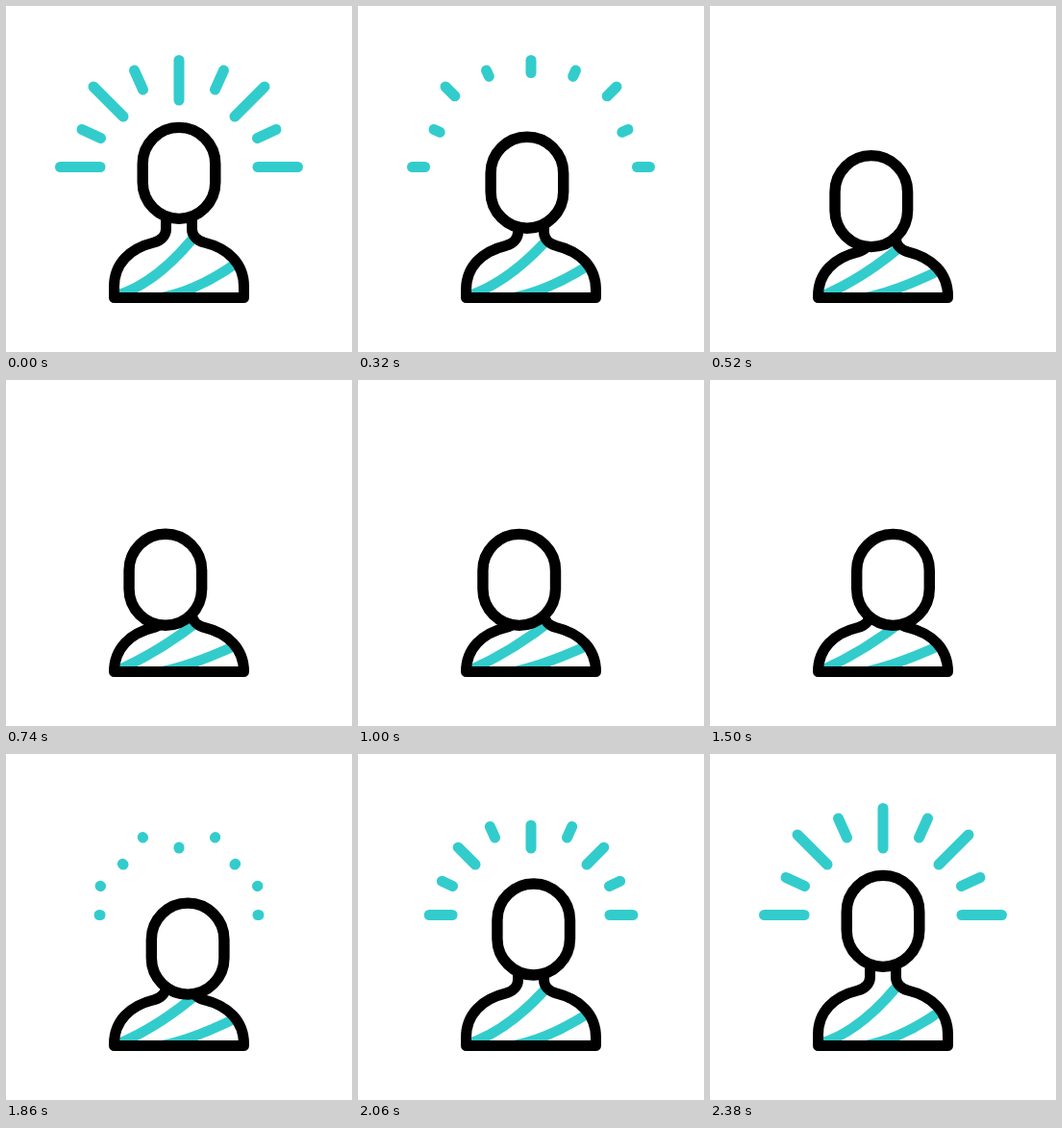
An HTML page for the animation above (2400 ms loop, 360 by 360 pixels).

```html
<!DOCTYPE html>
<html lang="en">
<head>
<meta charset="utf-8">
<title>Neck stretch</title>
<style>
  html, body { margin: 0; width: 100%; height: 100%; overflow: hidden; background: #fff; }
  svg { display: block; width: 100vw; height: 100vh; }
</style>
</head>
<body>
<svg viewBox="0 0 360 360" fill="none" stroke-linecap="round" stroke-linejoin="round">
  <clipPath id="torso"><path id="clip"/></clipPath>
  <g id="rays" stroke="#33cccc" stroke-width="11"></g>
  <g clip-path="url(#torso)" stroke="#33cccc" stroke-width="10.5">
    <path id="upper"/>
    <path id="lower"/>
  </g>
  <path id="body" stroke="#000" stroke-width="11"/>
  <rect id="head" x="142.2" y="126.4" width="75.6" height="95" rx="37.8" fill="#fff" stroke="#000" stroke-width="11.4"/>
</svg>
<script>
const LOOP = 2400, BASE = 303.5;
const DROP = 34, LEFT = -14.2, RIGHT = 10.8, SINK = 11.5;
const $ = id => document.getElementById(id);
const mix = (a, b, p) => a + (b - a) * p;

// Ease in and out along a cubic Bezier with handles at .64 and .3
function ease(x) {
  if (x <= 0) return 0;
  if (x >= 1) return 1;
  let lo = 0, hi = 1;
  for (let i = 0; i < 24; i++) {
    const s = (lo + hi) / 2, r = 1 - s;
    if (1.92 * s * r * r + 0.9 * s * s * r + s * s * s < x) lo = s; else hi = s;
  }
  return lo * lo * (3 - 2 * lo);
}
const phase = (t, from, to) => ease((t - from) / (to - from));

// Rays on the left half, outer end first; the right half mirrors them
const half = [
  [56.5, 167.5, 98, 167.5],
  [79, 128.5, 98.5, 137.5],
  [91, 84, 122, 115],
  [133.5, 67, 142.5, 87]
];
const rays = [...half, [180, 56.5, 180, 98], ...half.map(([a, b, c, d]) => [360 - a, b, 360 - c, d])]
  .map(ends => {
    const el = document.createElementNS('http://www.w3.org/2000/svg', 'line');
    $('rays').append(el);
    return { el, ends };
  });

function drawRays(from, to) {
  $('rays').style.display = to - from > 0.002 ? '' : 'none';
  for (const { el, ends: [x1, y1, x2, y2] } of rays) {
    el.setAttribute('x1', mix(x1, x2, from));
    el.setAttribute('y1', mix(y1, y2, from));
    el.setAttribute('x2', mix(x1, x2, to));
    el.setAttribute('y2', mix(y1, y2, to));
  }
}

// The shoulders slide down into the fixed base line
function bodyPath(sink) {
  const y = v => (v + sink).toFixed(2);
  return `M166.5 ${y(222)}V${y(232)}C166.5 ${y(239)} 161 ${y(244)} 154 ${y(246)}` +
    `C129 ${y(252)} 112.5 ${y(268)} 112.5 ${y(292)}V${BASE}H247.5V${y(292)}` +
    `C247.5 ${y(268)} 231 ${y(252)} 206 ${y(246)}` +
    `C199 ${y(244)} 193.5 ${y(239)} 193.5 ${y(232)}V${y(222)}`;
}

// A quadratic curve between its tall and its sunken form
function drawStripe(id, tall, sunk, p) {
  const [a, b, c, d, e, f] = tall.map((v, i) => mix(v, sunk[i], p));
  $(id).setAttribute('d', `M${a} ${b}Q${c} ${d} ${e} ${f}`);
}

function draw(t) {
  const down = phase(t, 0, 800), across = phase(t, 800, 1600), up = phase(t, 1600, 2400);
  const low = down - up;
  const x = mix(LEFT * down, RIGHT, across) * (1 - up);
  $('head').setAttribute('transform', `translate(${x} ${DROP * low})`);

  const d = bodyPath(SINK * low);
  $('body').setAttribute('d', d);
  $('clip').setAttribute('d', d);
  drawStripe('upper', [112, 302, 158, 290, 204, 230], [114, 303, 160, 283, 204, 248], low);
  drawStripe('lower', [164, 303, 206, 294, 250, 260], [164, 303, 200, 295, 250, 271], low);

  if (t < 1200) drawRays(0, 1 - phase(t, 88, 515));
  else drawRays(1 - phase(t, 1777, 2342), 1);
}

const start = performance.now();
function tick() {
  draw((performance.now() - start) % LOOP);
  requestAnimationFrame(tick);
}
draw(0);
requestAnimationFrame(tick);
</script>
</body>
</html>
```
